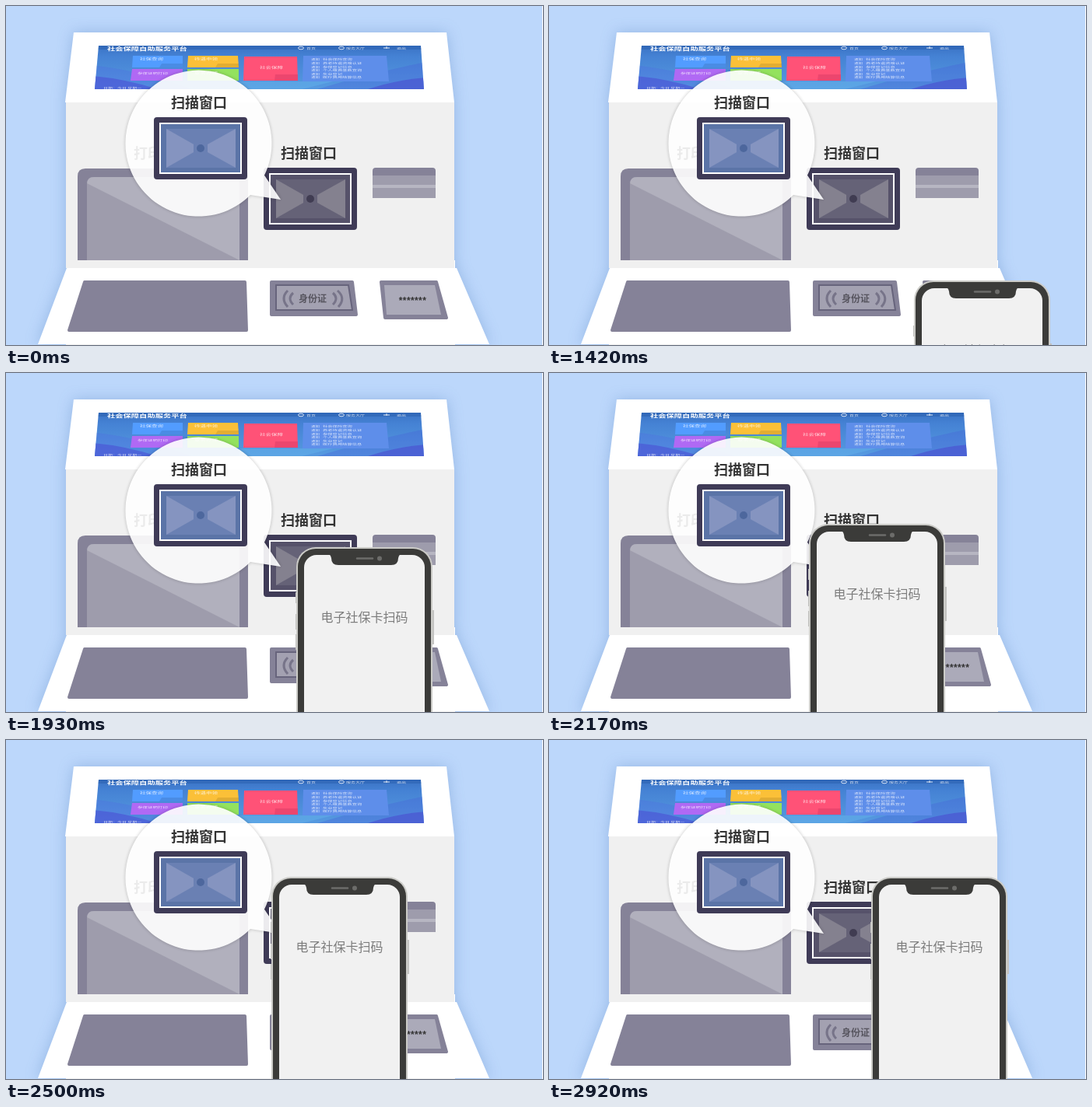
Animation of 690x436 px, one loop 3.45 s. Source, as an HTML page:

```html
<!DOCTYPE html>
<html lang="zh-CN">
<head>
<meta charset="utf-8">
<title>扫描窗口</title>
<style>
html, body { margin: 0; width: 100%; height: 100%; overflow: hidden; background: #bcd7fb; }
svg { display: block; width: 690px; height: 436px; font-family: "Noto Sans CJK SC", "Noto Sans CJK", sans-serif; }
.label { font-size: 18px; font-weight: 700; fill: #333; }
.tiny { fill: #fff; font-size: 6px; }
.metal { fill: #858298; }
.shadow { filter: drop-shadow(0 0 9px rgba(60, 110, 180, .3)); }
.glass { --edge: #5b74a7; --top: #6a80b3; --side: #8594c0; --dot: #4d679d; }
.slate { --edge: #56526a; --top: #656277; --side: #84818f; --dot: #403c52; }
</style>
</head>
<body>
<svg viewBox="0 0 690 436">
  <defs>
    <linearGradient id="sky" x2="0" y2="1">
      <stop offset="0" stop-color="#3a72c4"/>
      <stop offset=".25" stop-color="#4582d4"/>
      <stop offset="1" stop-color="#569ae0"/>
    </linearGradient>
    <clipPath id="screen"><path d="M119 51H533L537 107H114Z"/></clipPath>
    <clipPath id="tray"><path d="M104 327V229Q104 220 113 220H291Q300 220 300 229V327Z"/></clipPath>
    <g id="scanner">
      <rect width="120" height="80" rx="4" fill="#3f3b57"/>
      <rect x="8" y="8" width="104" height="64" fill="var(--edge)" stroke="#fff" stroke-width="2"/>
      <rect x="16" y="15" width="89" height="50" fill="var(--top)"/>
      <path d="M16 15L60 40L16 65ZM105 15L60 40L105 65Z" fill="var(--side)"/>
      <rect x="51" y="35" width="18" height="10" fill="var(--top)"/>
      <circle cx="60" cy="40" r="5" fill="var(--dot)"/>
    </g>
  </defs>

  <rect width="690" height="436" fill="#bcd7fb"/>
  <g class="shadow">
    <path d="M87 34H566L576 124V327H577V337H579L621 435H41L78 337H77V124H76Z" fill="#fff"/>
  </g>
  <path d="M77 124H576V337H77ZM77 435H577V436H77Z" fill="#f0f0f0"/>

  <g clip-path="url(#screen)">
    <rect x="110" y="51" width="430" height="56" fill="url(#sky)"/>
    <path d="M110 90Q150 93 195 107H110Z" fill="#4a50d2" opacity=".75"/>
    <path d="M110 76Q170 82 240 107H110Z" fill="#4f6ee0" opacity=".35"/>
    <path d="M540 72Q470 86 400 107H540Z" fill="#4668d8" opacity=".4"/>
    <path d="M540 92Q500 95 465 107H540Z" fill="#4a50d2" opacity=".65"/>
    <path d="M300 97H420L380 107H300Z" fill="#62aeea" opacity=".6"/>
    <path d="M118 51H534V56H118Z" fill="#2558a6" opacity=".4"/>
    <path d="M163 64H227V79H162Z" fill="#529cff"/>
    <path d="M234 64H298L299 79H233Z" fill="#fbc038"/>
    <path d="M162 81H227V96H160Z" fill="#b069f4"/>
    <path d="M233 81H299V96H233Z" fill="#93e25e"/>
    <path d="M306 65H374L375 96H305Z" fill="#ff5277"/>
    <path d="M200 74H227V79H197ZM272 74H299V79H269Z" opacity=".1"/>
    <path d="M346 88H375V96H345Z" fill="#d93a66" opacity=".5"/>
    <path d="M382 64H489L492 97H381Z" fill="#5e8eea"/>
    <text class="tiny" transform="translate(130 56.5) scale(1 .55)" style="font-size:10.3px;font-weight:700">社会保障自助服务平台</text>
    <g class="tiny" id="captions" opacity=".8"></g>
    <g fill="none" stroke="#fff" stroke-width=".8">
      <ellipse cx="379" cy="54" rx="3.5" ry="1.8"/>
      <ellipse cx="431" cy="54" rx="3.5" ry="1.8"/>
      <path d="M485 54H493M489 52V55"/>
    </g>
  </g>

  <text class="label" x="164" y="196">打印窗口</text>
  <path class="metal" d="M92 327V219Q92 209 102 209H301Q311 209 311 219V327Z"/>
  <g clip-path="url(#tray)">
    <rect x="104" y="220" width="196" height="107" fill="#9e9cac"/>
    <path d="M104 228V220H300V327Z" fill="#b1b0bd"/>
  </g>

  <text class="label" x="353" y="196">扫描窗口</text>
  <use href="#scanner" class="slate" x="331" y="208"/>

  <path class="metal" d="M471 218V212Q471 208 475 208H548Q552 208 552 212V218Z"/>
  <rect x="471" y="218" width="81" height="29" fill="#9e9cac"/>
  <rect x="471" y="230" width="81" height="4" fill="#b7b6c2"/>

  <g class="metal" stroke="#858298" stroke-width="4" stroke-linejoin="round">
    <path d="M101 355H307L309 417H81Z"/>
    <path d="M341 355H445L450 397H341Z"/>
    <path d="M482 355H553L566 401H487Z"/>
  </g>
  <path d="M347 359H440L445 391H347Z" fill="#a3a1b1" stroke="#67647c" stroke-width="2"/>
  <path d="M486 359H551L559 397H489Z" fill="#abaab9"/>
  <g fill="none" stroke="#777489" stroke-width="3">
    <path d="M362 366Q352 376 362 387M369 369Q361 376 369 384"/>
    <path d="M426 366Q437 376 427 387M420 369Q428 376 420 384"/>
  </g>
  <text x="376" y="381" font-size="12" font-weight="700" fill="#57555f">身份证</text>
  <text x="522.5" y="383" text-anchor="middle" font-size="12" font-weight="700" fill="#333" style="font-family:'Liberation Sans',Arial,sans-serif" letter-spacing=".4">*******</text>

  <path d="M332 217.700A94 94 0 1 0 314 243L353 249Z" fill="#fff" opacity=".9"
        style="filter:drop-shadow(0 0 2px rgba(0,0,0,.25))"/>
  <text class="label" x="212" y="131">扫描窗口</text>
  <use href="#scanner" class="glass" x="190" y="143"/>

  <g id="phone" visibility="hidden">
    <path d="M-1 58H1V72H-1ZM-1 86H1V106H-1ZM-1 112H1V132H-1ZM174 81H177V125H174Z" fill="#c3c3c1"/>
    <rect width="175" height="360" rx="25" fill="#cbcbc7"/>
    <rect x="2" y="2" width="171" height="356" rx="23" fill="#3b3b39"/>
    <rect x="10" y="10" width="155" height="340" rx="16" fill="#f1f1f1"/>
    <path d="M42 9H134Q131 11 131 14Q131 23 122 23H54Q45 23 45 14Q45 11 42 9Z" fill="#3b3b39"/>
    <path d="M78 14.500H98" stroke="#6c6c6a" stroke-width="2.500" stroke-linecap="round"/>
    <circle cx="107" cy="14.500" r="3" fill="#6c6c6a"/>
    <text x="31.500" y="96" font-size="16" font-weight="300" fill="#7c7c7c">电子社保卡扫码</text>
  </g>
  <rect x="689" width="1" height="436" fill="#fff"/>
</svg>
<script>
const LOOP = 3450, START = 1150, END = 2920, STEP = 30;

// [ms, left, top] of the phone; straight lines between
const path = [
  [1150, 522, 429],
  [1840, 387.5, 235],
  [2320, 310, 176],
  [2920, 414, 176]
];

// [x, baseline, size, text] of the small screen captions
const captions = [
  [386, 56, 6, "首页"], [437, 56, 6, "服务大厅"], [502, 56, 6, "退出"],
  [172, 70, 7.5, "社保查询"], [242, 70, 7.5, "待遇申领"],
  [169, 88, 6.5, "参保证明打印"], [242, 88, 7.5, "业务办理"],
  [326, 81, 7.5, "社会保障"], [125, 107, 6, "日期：今日 星期一"]
];
const notices = ["社会保险查询", "养老待遇资格认证", "参保登记信息", "个人缴费基数查询", "失业登记", "医疗费用结算信息"];
notices.forEach((text, i) => {
  const y = 70.3 + i * 4.6;
  captions.push([392, y, 5.5, "通知"], [407, y, 6.3, text]);
});

document.getElementById("captions").innerHTML = captions.map(([x, y, size, text]) =>
  `<text transform="translate(${x} ${y}) scale(1 .55)" style="font-size:${size}px">${text}</text>`).join("");

function place(t) {
  const i = Math.max(1, path.findIndex(p => p[0] >= t));
  const [t0, x0, y0] = path[i - 1], [t1, x1, y1] = path[i];
  const k = (t - t0) / (t1 - t0);
  return [x0 + (x1 - x0) * k, y0 + (y1 - y0) * k].map(Math.round);
}

const phone = document.getElementById("phone");
const begin = performance.now();

function draw() {
  const t = Math.max(0, performance.now() - begin) % LOOP;
  phone.setAttribute("visibility", t < START ? "hidden" : "visible");
  if (t >= START) {
    const step = START + Math.floor((t - START) / STEP) * STEP;
    const [x, y] = place(Math.min(END, step));
    phone.setAttribute("transform", `translate(${x} ${y})`);
  }
  requestAnimationFrame(draw);
}
draw();
</script>
</body>
</html>
```
